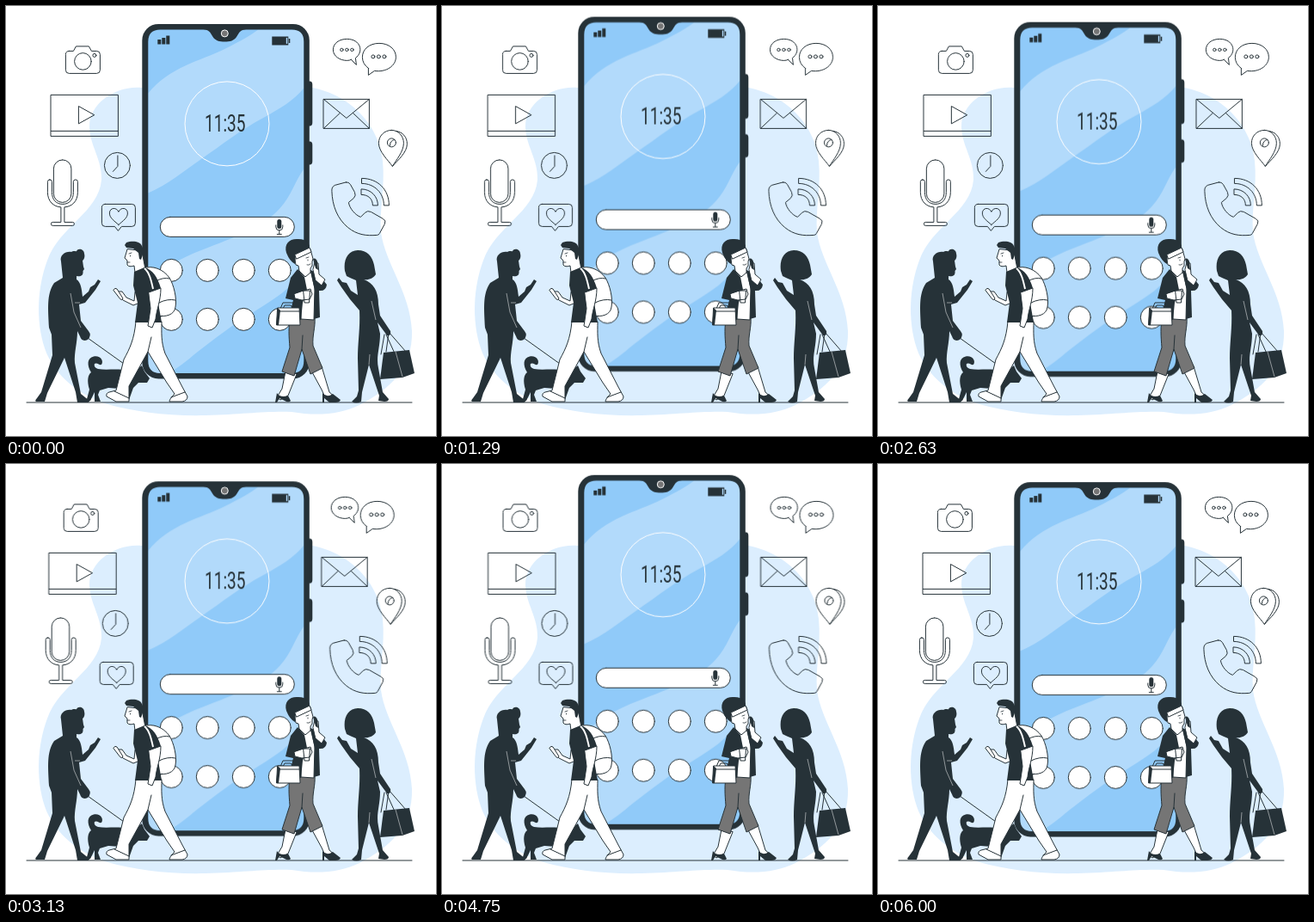
These frames come from a looping animation (500x500 px, 6040 ms). An HTML page:

```html
<!DOCTYPE html>
<html lang="en">
<head>
<meta charset="utf-8">
<title>Phone street</title>
<style>
  html, body { margin: 0; width: 100%; height: 100%; overflow: hidden; background: #fff; }
  svg { display: block; width: 100%; height: 100%; }
  .ink { fill: #263238; }
  .line { fill: none; stroke: #263238; stroke-linecap: round; stroke-linejoin: round; }
  .paper { fill: #fff; stroke: #263238; stroke-linejoin: round; stroke-linecap: round; }
  .seam { fill: none; stroke: #fff; stroke-width: .5; }
  .grey { fill: #757575; stroke: #263238; }
  .clock { font: 400 28px Roboto, sans-serif; text-anchor: middle; }
  .phone { animation: float 6040ms linear infinite; }
  .icons { animation: shake 6040ms linear infinite; }
  /* 3 s float and 6 s shake, inside a 6.04 s loop */
  @keyframes float {
    0%, 49.669%, 99.338%, 100% { transform: translateY(0); }
    24.834%, 74.503% { transform: translateY(-10px); }
  }
  @keyframes shake {
    0%, 99.338%, 100% { transform: translateX(0); }
    9.934%, 89.404% { transform: translateX(-1px); }
    19.868%, 79.47% { transform: translateX(2px); }
    29.801%, 49.669%, 69.536% { transform: translateX(-4px); }
    39.735%, 59.603% { transform: translateX(4px); }
  }
</style>
</head>
<body>
<svg viewBox="0 0 500 500">
  <defs>
    <path id="screen" d="M179 27H229C236 27 237 30 240 35C243 40 248 41 254 41S265 40 268 35C271 30 272 27 279 27H332Q346 27 346 41V412Q346 426.500 332 426.500H179Q165 426.500 165 412V41Q165 27 179 27Z"/>
    <clipPath id="glass"><use href="#screen"/></clipPath>
    <circle id="app" class="paper" r="13"/>
  </defs>

  <path fill="#dceefe" d="M158 95C128 92 97 113 97 140C97 162 112 178 111 202C108 240 62 256 48 296C37 325 34 364 45 398C56 430 86 453 118 463C150 472 190 477 232 476C275 475 300 471 332 472C362 477 388 475 411 464C448 445 473 420 472 378C470 333 441 300 436 263C434 236 441 211 438 180C434 137 396 96 340 93Z"/>

  <g class="phone"><g transform="translate(.3 .5)">
    <path class="ink" d="M350 87H353Q356 87 356 91V135Q356 139 353 139H350ZM350 157H353Q356 157 356 161V180Q356 184 353 184H350Z"/>
    <rect class="ink" x="158" y="20.500" width="194.500" height="412.500" rx="19"/>
    <use href="#screen" fill="#90caf9"/>
    <g clip-path="url(#glass)" fill="#fff" fill-opacity=".3">
      <path d="M165 101C190 70 225 64 255 49C273 40 285 33 293 27H346V95C335 109 318 119 298 130C272 144 252 160 226 178C206 192 188 207 165 217Z"/>
      <path d="M165 322C180 305 202 293 228 283C266 268 298 257 318 235C332 220 335 204 346 189V304C333 328 312 340 288 355C263 370 243 386 222 402C210 412 199 421 188 427H165Z"/>
    </g>
    <circle cx="254" cy="31.500" r="4" fill="#757575" stroke="#fff"/>
    <path class="ink" d="M176 38.500h4V44h-4ZM181 36.500h4V44h-4ZM186 34h4V44h-4ZM309 35h19v10h-19ZM328.500 37.500h1.500v5h-1.500Z"/>
    <path d="M325.500 36.500h1.500v7h-1.500Z" fill="#b1dafb"/>
    <circle cx="256.700" cy="136.500" r="49" fill="none" stroke="#fff"/>
    <text class="ink clock" transform="translate(254.500 146) scale(.68 1)">11:35</text>
    <rect class="paper" x="179" y="245" width="156" height="23" rx="11.500"/>
    <rect class="ink" x="315" y="247.500" width="5" height="11" rx="2.500"/>
    <path class="line" d="M313.500 254.500v2q0 4 4 4t4-4v-2M317.500 260.500v4M315 265h5"/>
    <use href="#app" x="192" y="307"/><use href="#app" x="234" y="307"/>
    <use href="#app" x="276" y="307"/><use href="#app" x="318" y="307"/>
    <use href="#app" x="192" y="364"/><use href="#app" x="234" y="364"/>
    <use href="#app" x="276" y="364"/><use href="#app" x="318" y="364"/>
  </g></g>

  <g class="icons line"><g transform="translate(.4 .4)">
    <path d="M73 52H78L81 46.500H96L99 52H105Q109 52 109 56V74Q109 78 105 78H73Q69 78 69 74V56Q69 52 73 52Z"/>
    <circle cx="89" cy="64" r="9.800"/><circle cx="102.500" cy="57" r="2"/>
    <path d="M52 103H130V151H52ZM52 145H130M84 116.500V136.500L102 126.500Z"/>
    <circle cx="129" cy="185" r="15"/><path d="M129.500 173.500V186L124 192"/>
    <rect x="55" y="178.500" width="20.500" height="49.500" rx="10.250"/>
    <path d="M50.500 201.500Q48 201.500 48 204V216C48 227 55 233 63.500 233.500V251H54Q52 251 52 253T54 255H77Q79 255 79 253T77 251H67.500V233.500C76 233 83 227 83 216V204Q83 201.500 80.500 201.500T78 204V216C78 225 73 230 65.500 230S53 225 53 216V204Q53 201.500 50.500 201.500Z"/>
    <path d="M115 230H146Q150 230 150 234V252Q150 256 146 256H134L130 261L126 256H115Q111 256 111 252V234Q111 230 115 230Z"/>
    <path d="M130.500 254C125 249 120 246 120 240.500C120 234 128 233 130.500 239C133 233 141 234 141 240.500C141 246 136 249 130.500 254Z"/>
    <path d="M401 62L407 68L406 60C416 53 412 38 396 38C387 38 380 43 380 50.500S388 63 396 63Q399 63 401 62Z"/>
    <circle cx="390" cy="50.500" r="1.700"/><circle cx="396" cy="50.500" r="1.700"/><circle cx="402" cy="50.500" r="1.700"/>
    <path d="M421 72L421 80L428 75C442 77 453 69 453 59C453 50 445 43 433.500 43S414 50 414 59Q414 67 421 72Z"/>
    <circle cx="426.500" cy="58.500" r="2"/><circle cx="433" cy="58.500" r="2"/><circle cx="439.500" cy="58.500" r="2"/>
    <path d="M369 108H422V142H369ZM369 108L395.500 130L422 108M369 142L388 124M422 142L403 124"/>
    <path d="M448 144C439 144 433 151 433 159C433 169 444 179 449 186C453 179 462 169 462 159C462 151 456 144 448 144ZM453 145C461 146 466 152 466 160C466 170 455 179 449 186"/>
    <circle cx="448" cy="158.500" r="5"/><path d="M446 162Q446 156 451.500 155"/>
    <path d="M395 204.500L382 208Q378 210 378.500 215C379 232 385 247 397 257C408 266 419 267 431 266Q433 266 434 264L440 253Q442 249 438 247L424 239Q420 237 417 240L412 245C406 243 399 235 398 228L404 223Q407 220 405 216L400 207Q398 204 395 204.500Z"/>
    <path d="M413.500 200C432 200 445 213 445 231.500H439C439 217 428 206 413.500 206ZM413 212.500C424 212.500 432 221 432 231.500H426C426 224 421 219 413 219Z"/>
  </g></g>

  <path class="line" d="M24 461H472"/>

  <!-- man with the dog -->
  <path class="line" d="M95 386L137 416"/>
  <g class="ink">
    <path d="M64 297C62 290 69 285 76 286C79 284 81 286 82 285C84 281 91 283 91 288C92 291 91 295 89 296L90 303L91 306L89.500 308C90 313 88 315 82 314L82 318C87 321 88 329 89 338L96 332L98 327L103 324L107 318L110 320L104 330L92 345L85 347L87 366L96 378Q100 383 95 388Q88 391 86 384L83 378C83 392 79 403 80 415L87 451L97 459Q97 461 94 461H83L81 449L68 409L48 450L45 460H35Q33 459 36 456L41 449L54 406L53 382L50 374C49 352 47 335 56 322L66 316Z"/>
    <path d="M94 457L97 446C94 436 95 429 99 426C94 418 94 409 102 407.500C110 406 114 413 111 417C108 418 106 414 103 416C102 419 104 421 107 422C117 424 130 421 141 424L150 419L153 422L158 418L161 425L167 433L164 438L154 438L148 444L143 458H132L133 445L119 444L109 447L107 452L110 460H103L103 449L98 459Q92 461 94 457Z"/>
  </g>
  <path class="seam" d="M75 334L79 356L87 374M86 345L80 345"/>

  <!-- man with the backpack -->
  <path class="paper" d="M160 305C170 301 183 306 190 316C195 324 199 340 197 350C196 359 186 362 176 360L166 338Z"/>
  <path class="line" d="M174 320Q183 315 190 317M178 345Q188 340 197 342"/>
  <path class="paper" d="M151 367L181 367C181 380 180 390 185 404L205 443L211 454Q211 459 205 460H190Q190 457 196 451L187 438L165 402L143 442L143 460H128L117 454Q116 450 120 449L128 447L137 411C144 398 149 388 151 367Z"/>
  <path class="line" d="M165 402L169 385M126 448L143 456M192 455L208 449"/>
  <path class="paper" d="M141 283L138 293L141 296L141 301Q143 304 149 302L150 310L162 306L158 285Z"/>
  <path class="ink" d="M138 278L140 275C146 273 156 273 158 279C161 284 159 290 157 295L155 294L154 287L148 282L140 281Z"/>
  <path class="line" stroke-width=".8" d="M143 288L146 287M144.500 290V291M141 298L144 298"/>
  <path class="paper" d="M150 333L149 343L140 339L135 332L130 332L130 336L136 342L148 348L158 344Z"/>
  <path class="paper" d="M125 330Q127 327 129 329L136 340Q135 343 133 341Z"/>
  <path class="ink" d="M149 309L161 304C171 307 176 315 180 328L175 334L181 368H150L153 345L148 325Z"/>
  <path class="paper" d="M166 333L180 328C180 343 175 353 174 364L170 374L165 372L168 352Z"/>
  <path d="M161 305C167 310 169 320 171 329" fill="none" stroke="#fff" stroke-width="2"/>

  <!-- woman on the call -->
  <path class="paper" d="M325 425L321 445L315 455L319 458L328 453L338 428ZM355 424L367 446L372 457L384 456L376 449L367 419Z"/>
  <path class="ink" d="M315 450Q319 456 328 453L331 459Q330 461 326 460L318 456L315 461H313ZM368 450Q373 456 380 451L389 458Q388 461 383 461H376L370 456L370 461H368Z"/>
  <path class="grey" d="M331 360L359 362C360 374 356 382 357 395L368 421L354 428L344 399L335 430L321 425L330 397C329 385 328 372 331 360Z"/>
  <path class="line" d="M344 399L345 383"/>
  <path class="paper" d="M341 305L354 307L359 328L358 365L343 364L343 332Z"/>
  <path class="paper" d="M335 289L337 301L340 302L341 308L348 315L354 310V305Q357 303 356 297L357 294L354 283Z"/>
  <path class="ink" d="M326 287C323 276 330 270 340 271C350 271 354 277 353 283L337 288L336 300Q330 297 326 287Z"/>
  <path class="paper" d="M336 289L353 281L355 286L338 294Z"/>
  <path class="line" stroke-width=".8" d="M349 293L352 292M351 295V296M350 301Q352 302 354 300"/>
  <path class="ink" d="M339 306L347 315L350 330L345 345L343 365L329 361L334 342L325 340L331 316ZM354 307L363 311L369 319L373 324Q372 332 364 331L365 362L358 364L359 331Z"/>
  <path class="paper" d="M357 306L359 298L363 299L364 312L371 318L367 325L360 319Z"/>
  <path class="ink" d="M357 294Q360 292 362 297L363 307L360 305Z"/>
  <path class="paper" d="M346 331L354 329L356 335L353 341L344 342L336 340L335 335ZM346 331H353.500L352.500 345H347.500Z"/>
  <path class="line" d="M319 352L322 345H334L337 352M322 352L324 348H331L334 352"/>
  <path class="paper" d="M316 351H341L342 371H315Z"/>
  <path class="ink" d="M316 351L319 354L317 371H314Z"/>
  <path class="line" d="M317 355H341"/>

  <!-- woman with the bags -->
  <path class="line" d="M440 382L436 405M442 382L452 404M445 379L465 402M445 380L442 402"/>
  <g class="ink">
    <path d="M394 308C392 295 398 284 409 284C420 284 426 291 428 301L430 312C427 317 421 319 416 318C427 322 433 331 433 347L435 360L447 378Q448 384 443 383L432 368L435 381C435 398 430 407 433 421L438 449L445 457Q445 460 440 460L433 459L434 453L422 417L414 449L413 460Q407 463 402 460L408 454L410 447L409 410C409 390 412 375 411 354L400 341L390 327L385 319L387 316L391 321L396 322L401 331L409 336L407 319L400 316L396 314Z"/>
    <path d="M439 403L469 400L475 427L461 432L435 434Z"/>
  </g>
  <path class="seam" d="M453 402L461 431M430 365L425 343M422 417L423 405"/>
</svg>
</body>
</html>
```
